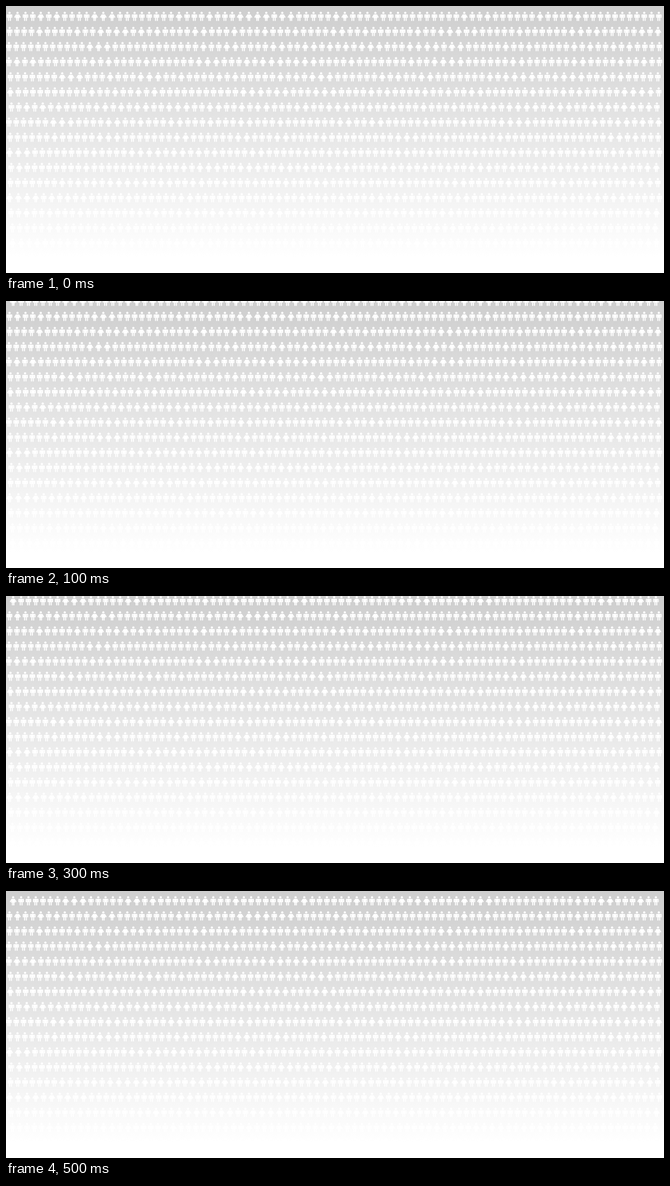
Animation of 1173x477 px, one loop 0.55 s. Source, as an HTML page with a canvas:

```html
<!DOCTYPE html>
<html lang="en">
<head>
<meta charset="utf-8">
<title>Crowd</title>
<style>
  html, body { margin: 0; width: 100%; height: 100%; overflow: hidden; background: #fff; }
  canvas { display: block; }
</style>
</head>
<body>
<canvas id="stage" width="1173" height="477"></canvas>
<script>
const ctx = document.getElementById('stage').getContext('2d');
const W = 1173, H = 477, LOOP = 550;
const ROW_GAP = 27, FIRST_Y = 18.5, CENTER_X = 585;

// Each pictogram is centred on 0,0 and about 17px tall.
const man = {
  width: 13,
  body: new Path2D('M-4-3.6H4L2.6-1.8V2.4H-2.6V-1.8Z'),
  limbs: new Path2D('M-4-2.6V1.8M4-2.6V1.8M-1.6 1V7.4M1.6 1V7.4')
};
const woman = {
  width: 15.5,
  body: new Path2D('M-2.2-3.6H2.2L3.8 3.2H-3.8Z'),
  limbs: new Path2D('M-2.3-2.7L-4.9 1.4M2.3-2.7L4.9 1.4M-1.3 3V7.4M1.3 3V7.4')
};
const head = new Path2D();
head.arc(0, -6.3, 2, 0, 7);

let seed = 29;
function random() {
  seed = (Math.imul(seed, 1664525) + 1013904223) >>> 0;
  return seed / 2 ** 32;
}

// Fill a row until no further person fits, then centre it.
function makeRow() {
  const people = [];
  let width = 0;
  while (width < W - man.width) {
    const fits = width + woman.width <= W;
    const kind = fits && random() < 0.3 ? woman : man;
    people.push({ kind, x: width + kind.width / 2 });
    width += kind.width;
  }
  return people.map(p => ({ kind: p.kind, x: p.x + CENTER_X - width / 2 }));
}
const rows = Array.from({ length: 18 }, makeRow);

const sky = ctx.createLinearGradient(0, 0, 0, 450);
sky.addColorStop(0, '#cecece');
sky.addColorStop(1, '#fff');

function drawPerson({ kind, x }, y) {
  ctx.setTransform(1, 0, 0, 1, x, y);
  ctx.fill(head);
  ctx.fill(kind.body);
  ctx.stroke(kind.limbs);
}

function scrollAt(t) {
  return t < 100 ? 0 : t < 300 ? 9 : t < 500 ? 17 : 26;
}

function draw() {
  const scroll = scrollAt(performance.now() % LOOP);
  ctx.setTransform(1, 0, 0, 1, 0, 0);
  ctx.fillStyle = sky;
  ctx.fillRect(0, 0, W, H);
  ctx.fillStyle = ctx.strokeStyle = '#fff';
  ctx.lineWidth = 1.9;
  ctx.lineCap = 'round';
  rows.forEach((row, i) => {
    const y = FIRST_Y + (i - 1) * ROW_GAP + scroll;
    row.forEach(person => drawPerson(person, y));
  });
  requestAnimationFrame(draw);
}
draw();
</script>
</body>
</html>
```
